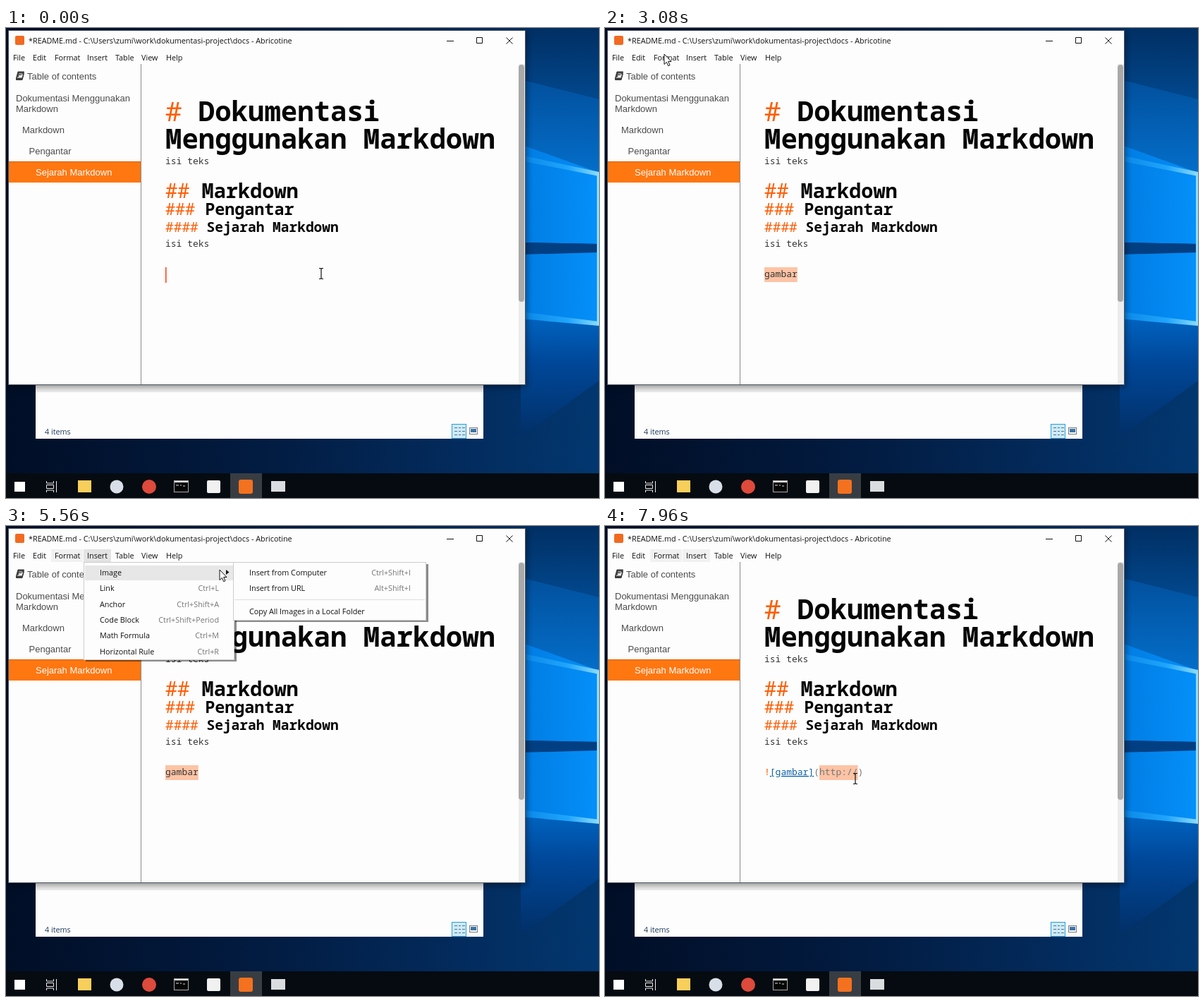
An HTML page for the animation above (8 s loop, 841 by 666 pixels).

```html
<!DOCTYPE html>
<html lang="id">
<head>
<meta charset="utf-8">
<title>Markdown editor</title>
<style>
  html, body { margin: 0; height: 100%; overflow: hidden; background: #021531; }
  svg { display: block; width: 100vw; height: 100vh; }
  text { white-space: pre; }
  .ui { font: 10.8px "Open Sans", "Noto Sans", sans-serif; fill: #111; }
  .keys { fill: #777; text-anchor: end; }
  .toc { font: 13px "Liberation Sans", Arial, sans-serif; fill: #4c4c4c; }
  .code { font-family: "Noto Sans Mono", "DejaVu Sans Mono", monospace; font-size: 13px; fill: #333; }
  .head { font-weight: 700; fill: #060606; }
  .mark { font-weight: 400; fill: #ff5d05; }
</style>
</head>
<body>
<svg viewBox="0 0 841 666">
  <defs>
    <linearGradient id="night">
      <stop offset="0" stop-color="#010e26"/><stop offset=".45" stop-color="#021c42"/>
      <stop offset=".8" stop-color="#032d60"/><stop offset="1" stop-color="#02376f"/>
    </linearGradient>
    <linearGradient id="sky" x2="0" y2="1">
      <stop offset="0" stop-color="#012f63"/><stop offset="1" stop-color="#024a92"/>
    </linearGradient>
    <linearGradient id="haze" x2="0" y2="1">
      <stop offset="0" stop-color="#02509d"/><stop offset="1" stop-color="#0470cc"/>
    </linearGradient>
    <linearGradient id="beam">
      <stop offset="0" stop-color="#007ce2"/><stop offset="1" stop-color="#0590fa"/>
    </linearGradient>
    <linearGradient id="glow">
      <stop offset="0" stop-color="#0a86e8"/><stop offset=".6" stop-color="#1fa5fb"/>
      <stop offset="1" stop-color="#8fdcff"/>
    </linearGradient>
    <linearGradient id="dusk" x2="0" y2="1">
      <stop offset="0" stop-color="#0068c6"/><stop offset=".4" stop-color="#00489a"/>
      <stop offset="1" stop-color="#022f66"/>
    </linearGradient>
    <filter id="soft"><feGaussianBlur stdDeviation="4"/></filter>
  </defs>

  <!-- Desktop -->
  <rect width="841" height="666" fill="url(#night)"/>
  <path d="M730 0H841V110H730Z" fill="url(#sky)"/>
  <path d="M730 73L841 101V215H730Z" fill="url(#haze)"/>
  <path d="M730 400H841V500L730 580Z" fill="url(#dusk)"/>
  <path d="M730 165L841 205V306L730 304Z" fill="url(#beam)"/>
  <path d="M730 180L841 204V210L730 188Z" fill="url(#glow)"/>
  <path d="M730 304L841 306V319L730 322Z" fill="#023f82"/>
  <path d="M730 321L841 318V420L730 408Z" fill="url(#beam)"/>
  <path d="M730 402L841 416V422L730 412Z" fill="url(#glow)"/>
  <rect x="838" y="207" width="3" height="213" fill="#8fdcff"/>

  <!-- Window behind -->
  <rect x="42" y="500" width="635" height="82" fill="#fdfdfd"/>
  <rect x="42" y="505" width="635" height="11" fill="#ededed"/>
  <text class="ui" x="55" y="576" style="fill:#1e395b">4 items</text>
  <rect x="632.5" y="561.5" width="20" height="20" fill="#cdeafa" stroke="#2a9fd6"/>
  <path d="M636 566.5h4m2 0h3m2 0h4M636 571.5h4m2 0h3m2 0h4M636 576.5h4m2 0h3m2 0h4" stroke="#53748a"/>
  <rect x="657.5" y="566.5" width="11" height="9" fill="#fff" stroke="#777"/>
  <rect x="659" y="568" width="8" height="5" fill="#3974a8"/>

  <!-- Editor window -->
  <rect x="2" y="5" width="737" height="504" fill="#000" opacity=".4" filter="url(#soft)"/>
  <rect x="3.5" y="3.5" width="733" height="502" fill="#fdfdfd" stroke="#4a5562"/>
  <rect x="13" y="11" width="13" height="13" rx="2" fill="#f26a21"/>
  <text class="ui" x="32" y="22">*README.md - C:\Users\zumi\work\dokumentasi-project\docs - Abricotine</text>
  <path d="M625 18.5h10M667.5 13.5h8v8h-8zM709.5 13.5l9 9m0-9l-9 9" fill="none" stroke="#111"/>
  <rect id="formatHot" x="64" y="33" width="45" height="18"/>
  <rect id="insertHot" x="110" y="33" width="39" height="18"/>
  <g id="menuBar" class="ui"></g>

  <rect id="tocHover" x="5" width="186" fill="#f4f4f4"/>
  <path d="M17 62h8.500l-2.500 9h-8.500zM14.500 71v2.500h8.500l2.500-9" fill="#444" stroke="#333"/>
  <path d="M18.500 65h4.500m-5.200 2.500h4.500" stroke="#eee"/>
  <rect x="4" y="189" width="187" height="30" fill="#ff7711"/>
  <path d="M4 189.500h187" stroke="#d85f05"/>
  <g class="toc">
    <text x="30" y="73">Table of contents</text>
    <text x="14" y="104">Dokumentasi Menggunakan</text>
    <text x="14" y="119">Markdown</text>
    <text x="23" y="149">Markdown</text>
    <text x="32.500" y="179">Pengantar</text>
    <text x="42" y="209" style="fill:#fff">Sejarah Markdown</text>
  </g>
  <path d="M191.500 51v454" stroke="#8a8a8a"/>
  <rect x="727" y="51" width="9" height="454" fill="#ececec"/>
  <rect x="727" y="52" width="8" height="336" rx="4" fill="#a9a9a9"/>

  <g class="code">
    <g class="head">
      <text x="226" y="132" font-size="39"><tspan class="mark">#</tspan> Dokumentasi</text>
      <text x="226" y="171" font-size="39">Menggunakan Markdown</text>
      <text x="226" y="241" font-size="28.6"><tspan class="mark">##</tspan> Markdown</text>
      <text x="226" y="265" font-size="23.4"><tspan class="mark">###</tspan> Pengantar</text>
      <text x="226" y="289" font-size="19.5"><tspan class="mark">####</tspan> Sejarah Markdown</text>
    </g>
    <text x="226" y="193">isi teks</text>
    <text x="226" y="310">isi teks</text>
    <rect id="selection" y="339" height="21" fill="#fdc3a5"/>
    <text id="typed" x="226" y="353"></text>
    <text id="link" x="226" y="353" fill="#777"><tspan class="mark">!</tspan><tspan fill="#0b62a8" text-decoration="underline">[gambar]</tspan>(http://)</text>
    <rect id="caret" y="339" width="1.6" height="22" fill="#ff4a1c"/>
  </g>
  <g id="menus" class="ui"></g>

  <!-- Taskbar -->
  <rect y="631" width="841" height="35" fill="#060b11"/>
  <rect x="318" y="631" width="45" height="35" fill="#383d43"/>
  <rect x="12" y="643" width="15" height="14" fill="#fff"/>
  <path d="M57.500 642v3h10v-3M57.500 658v-3h10v3M57.500 647.500h10v5h-10zM71.500 642v16" fill="none" stroke="#eee"/>
  <rect x="102" y="641" width="19" height="17" fill="#f8cf5b"/>
  <circle cx="157" cy="650" r="9.500" fill="#d9dfe9"/>
  <circle cx="203" cy="650" r="10" fill="#de4a3b"/>
  <rect x="238.500" y="641.500" width="20" height="16" fill="#050505" stroke="#aaa"/>
  <path d="M239 643h19" stroke="#ddd" stroke-width="2"/>
  <path d="M241 648h4m2 0h2m2 1h3" stroke="#ddd"/>
  <rect x="285" y="641" width="19" height="18" rx="2" fill="#f1f1f1"/>
  <rect x="330" y="640" width="20" height="20" rx="3" fill="#f4711f"/>
  <rect x="376" y="642" width="20" height="15" fill="#dadde0"/>

  <circle id="click" r="10.500" fill="#ffe21a" opacity=".72"/>
  <path id="arrow" d="M0 0V14.500L3.400 11.400L5.700 16.700L8 15.700L5.700 10.500H10Z" fill="#fff" stroke="#111"/>
  <path id="beamCursor" d="M-3-7.500H-1L0-6.500L1-7.500H3M0-6.500V6.500M-3 7.500H-1L0 6.500L1 7.500H3" fill="none" stroke="#111" stroke-width="1.200"/>
</svg>

<script>
const $ = id => document.getElementById(id);
const show = (id, on) => $(id).style.display = on ? '' : 'none';
const set = (id, attrs) => { for (const k in attrs) $(id).setAttribute(k, attrs[k]); };
const LOOP = 8000, LEFT = 226, CHAR = 7.8, ROW = 22.3, GAP = 10.7;

const bar = { File: 10, Edit: 38, Format: 69, Insert: 115, Table: 155, View: 192, Help: 227 };
$('menuBar').innerHTML = Object.entries(bar)
  .map(([name, x]) => `<text x="${x}" y="46">${name}</text>`).join('');

// Items read "Label|Keys"; "-" is a separator and ">" opens a submenu.
function addMenu(id, x, width, items) {
  let y = 55, body = '', rows = 0;
  for (const item of items) {
    if (item === '-') {
      body += `<path d="M${x + 2} ${Math.round(y + GAP / 2) - .5}h${width - 4}" stroke="#dedede"/>`;
      y += GAP;
      continue;
    }
    const [label, keys] = item.split('|'), base = Math.round(y + 15);
    body += `<rect id="${id}${rows++}" x="${x + 2}" y="${base - 14}" width="${width - 4}" height="21" fill="#e7e7e7"/>
      <text x="${x + 23}" y="${base}">${label}</text>`;
    body += keys === '>'
      ? `<path d="M${x + width - 12} ${base - 8}v7l4.500-3.500z"/>`
      : `<text class="keys" x="${x + width - 22}" y="${base}">${keys}</text>`;
    y += ROW;
  }
  const height = Math.round(y - 50);
  $('menus').insertAdjacentHTML('beforeend', `<g id="${id}">
    <rect x="${x + 3}" y="54" width="${width}" height="${height - 1}" fill="#000" opacity=".45"/>
    <rect x="${x + .5}" y="51.500" width="${width - 1}" height="${height - 1}" fill="#fdfdfd" stroke="#ccc"/>
    ${body}</g>`);
  for (let i = 0; i < rows; i++) show(id + i, false);
}

addMenu('format', 64, 191, ['Bold|Ctrl+B', 'Italic|Ctrl+I', 'Strikethrough|Ctrl+D', 'Code|Ctrl+K', '-',
  ...[1, 2, 3, 4, 5, 6].map(n => `Heading ${n}|Ctrl+${n}`), '-',
  'Unordered List|Ctrl+U', 'Ordered List|Ctrl+O', 'Todo List|Ctrl+T', 'Quote|Ctrl+Q']);
addMenu('insert', 110, 214, ['Image|>', 'Link|Ctrl+L', 'Anchor|Ctrl+Shift+A',
  'Code Block|Ctrl+Shift+Period', 'Math Formula|Ctrl+M', 'Horizontal Rule|Ctrl+R']);
addMenu('image', 322, 274, ['Insert from Computer|Ctrl+Shift+I', 'Insert from URL|Alt+Shift+I', '-',
  'Copy All Images in a Local Folder|']);

// Pointer moves: start, end, destination, optional bend point.
const moves = [
  [1380, 1900, 266, 353, 350, 358],
  [2220, 2480, 303, 376],
  [2480, 3000, 115, 51, 215, 140],
  [3000, 3080, 84, 37],
  [3160, 3300, 80, 37],
  [4470, 4670, 123, 38],
  [4720, 5020, 135, 60],
  [5200, 5480, 303, 62],
  [6040, 6360, 395, 86, 345, 64],
  [7480, 7960, 355, 358, 570, 200]
];

function pointer(t) {
  let x = 447, y = 348;
  for (const [from, to, x1, y1, cx = (x + x1) / 2, cy = (y + y1) / 2] of moves) {
    if (t < from) break;
    const u = Math.min(1, (t - from) / (to - from)), k = u * u * (3 - 2 * u);
    const bend = (a, c, b) => (1 - k) ** 2 * a + 2 * k * (1 - k) * c + k * k * b;
    [x, y] = [bend(x, cx, x1), bend(y, cy, y1)];
  }
  return [x, y];
}

function render(t) {
  const between = (a, b) => t >= a && t < b;
  const [x, y] = pointer(t);

  const count = t >= 820 ? 6 : t < 140 ? 0 : Math.min(5, 1 + Math.floor((t - 140) / 65));
  const linked = t >= 6980;
  $('typed').textContent = 'gambar'.slice(0, count);
  show('typed', !linked);
  show('link', linked);
  show('selection', t >= 2020);
  set('selection', linked ? { x: LEFT + 10 * CHAR, width: 7 * CHAR } : { x: LEFT, width: 6 * CHAR });
  show('caret', t < 1220 || between(1750, 2020));
  set('caret', { x: LEFT + count * CHAR });

  const menuOpen = between(3520, 6900);
  show('format', between(3520, 4600));
  show('insert', between(4600, 6900));
  show('image', between(5520, 6900));
  show('insert0', y > 55);
  show('image0', x > 324 && y < 77);
  show('image1', x > 324 && y >= 77);
  show('formatHot', t >= 3440);
  set('formatHot', { fill: t < 4710 ? '#e0e0e0' : '#f1f1f1' });
  show('insertHot', t >= 4710);
  set('insertHot', { fill: t < 7120 ? '#e3e3e3' : '#f1f1f1' });

  const section = [[84, 45], [129, 30], [159, 30]].find(([top, h]) => y >= top && y < top + h);
  show('tocHover', x < 191 && section && !menuOpen);
  if (section) set('tocHover', { y: section[0], height: section[1] });

  const overText = x > 192 && y > 51 && !menuOpen;
  const place = { transform: `translate(${x} ${y})` };
  show('beamCursor', overText);
  show('arrow', !overText);
  show('click', between(1900, 1960) || between(2020, 2140) || between(3440, 3560) || between(6820, 6900));
  for (const id of ['beamCursor', 'arrow', 'click']) set(id, place);
}

const start = performance.now();
(function tick() {
  render((performance.now() - start) % LOOP);
  requestAnimationFrame(tick);
})();
</script>
</body>
</html>
```
